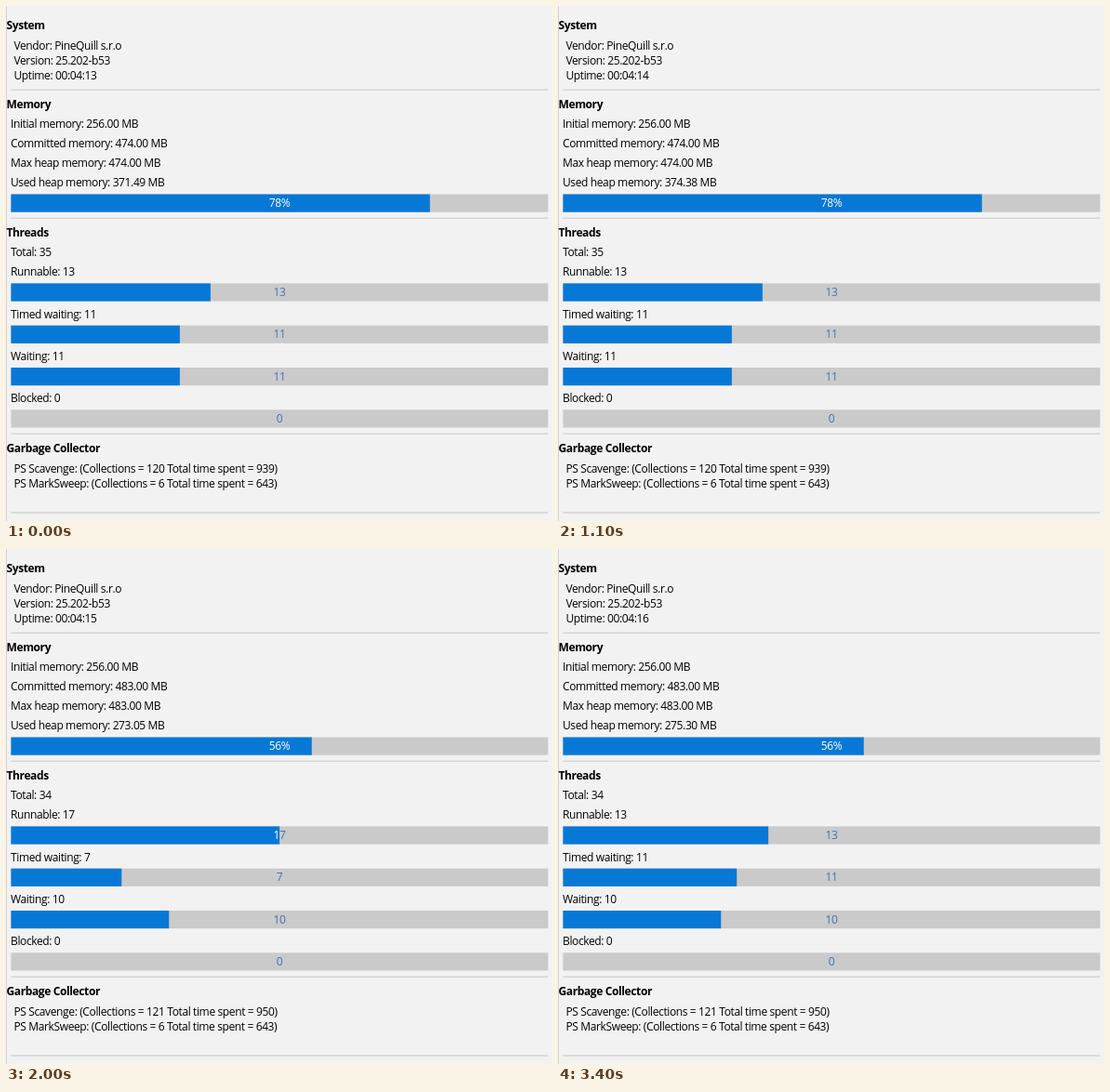
These frames come from a looping animation (587x554 px, 3.5 s). An HTML page with a canvas:

```html
<!DOCTYPE html>
<html>
<head>
<meta charset="utf-8">
<style>
html, body { margin: 0; width: 100%; height: 100%; overflow: hidden; background: #f2f2f2; }
canvas { display: block; }
</style>
</head>
<body>
<canvas id="stage" width="587" height="554"></canvas>
<script>
const ctx = document.getElementById('stage').getContext('2d');
const LOOP = 3500, LEFT = 5.4, WIDTH = 577.4, BAR = 19.2;
const BLUE = '#0878d7', GREY = '#cacaca';

// Each sample keeps the earlier values and overrides what changed.
const samples = [
  { at: 0, sec: 13, heap: 474, used: 371.49, total: 35, run: 13, timed: 11, wait: 11, scav: 120, spent: 939 },
  { at: 600, sec: 14, used: 372.94 },
  { at: 1100, used: 374.38 },
  { at: 1600, sec: 15, heap: 483, used: 273.05, total: 34, run: 17, timed: 7, wait: 10, scav: 121, spent: 950 },
  { at: 2100, used: 273.62, run: 13, timed: 11 },
  { at: 2600, sec: 16 },
  { at: 3100, used: 275.30 }
];

function text(str, x, y, color = '#000', weight = 400) {
  ctx.font = `${weight} 12px "Open Sans", "Noto Sans", sans-serif`;
  ctx.letterSpacing = '-0.38px';
  ctx.fillStyle = color;
  ctx.fillText(str, x, y);
}

function rect(x, y, w, h, color) {
  ctx.fillStyle = color;
  ctx.fillRect(x, y, w, h);
}

const title = (str, y) => text(str, 0.5, y, '#000', 700);
const line = (str, y) => text(str, 5, y);
const detail = (str, y) => text(str, 8.5, y);
const rule = y => rect(LEFT, y, WIDTH, 1, '#c6c6c6');

// The label turns white where the filled part covers it.
function bar(y, part, label) {
  const fill = WIDTH * part;
  rect(LEFT, y, WIDTH, BAR, GREY);
  rect(LEFT, y, fill, BAR, BLUE);
  const half = (x, w, color) => {
    ctx.save();
    ctx.beginPath();
    ctx.rect(x, y, w, BAR);
    ctx.clip();
    ctx.textAlign = 'center';
    text(label, 294, Math.round(y + 13.7), color);
    ctx.restore();
  };
  half(LEFT, fill, '#fff');
  half(LEFT + fill, WIDTH - fill, '#3f74b0');
}

function draw(s) {
  const mb = n => n.toFixed(2) + ' MB';
  rect(0, 0, 587, 554, '#f2f2f2');
  rect(0, 0, 1, 554, '#d0d0d0');
  [89.7, 227.7, 459.7, 544.5].forEach(rule);

  title('System', 25);
  detail('Vendor: PineQuill s.r.o', 47);
  detail('Version: 25.202-b53', 63);
  detail('Uptime: 00:04:' + s.sec, 79);

  title('Memory', 110);
  line('Initial memory: 256.00 MB', 131);
  line('Committed memory: ' + mb(s.heap), 152);
  line('Max heap memory: ' + mb(s.heap), 173);
  line('Used heap memory: ' + mb(s.used), 194);
  const percent = Math.floor(s.used / s.heap * 100);
  bar(202.5, percent / 100, percent + '%');

  title('Threads', 248);
  line('Total: ' + s.total, 269);
  [['Runnable', s.run], ['Timed waiting', s.timed], ['Waiting', s.wait], ['Blocked', 0]]
    .forEach(([name, n], i) => {
      const y = 298.4 + 45.3 * i;
      line(`${name}: ${n}`, Math.round(y - 8.2));
      bar(y, n / s.total, n);
    });

  title('Garbage Collector', 480);
  detail(`PS Scavenge: (Collections = ${s.scav} Total time spent = ${s.spent})`, 502);
  detail('PS MarkSweep: (Collections = 6 Total time spent = 643)', 518);
}

const start = performance.now();
function tick() {
  const t = (performance.now() - start) % LOOP;
  draw(Object.assign({}, ...samples.filter(s => s.at <= t)));
  requestAnimationFrame(tick);
}
tick();
</script>
</body>
</html>
```
